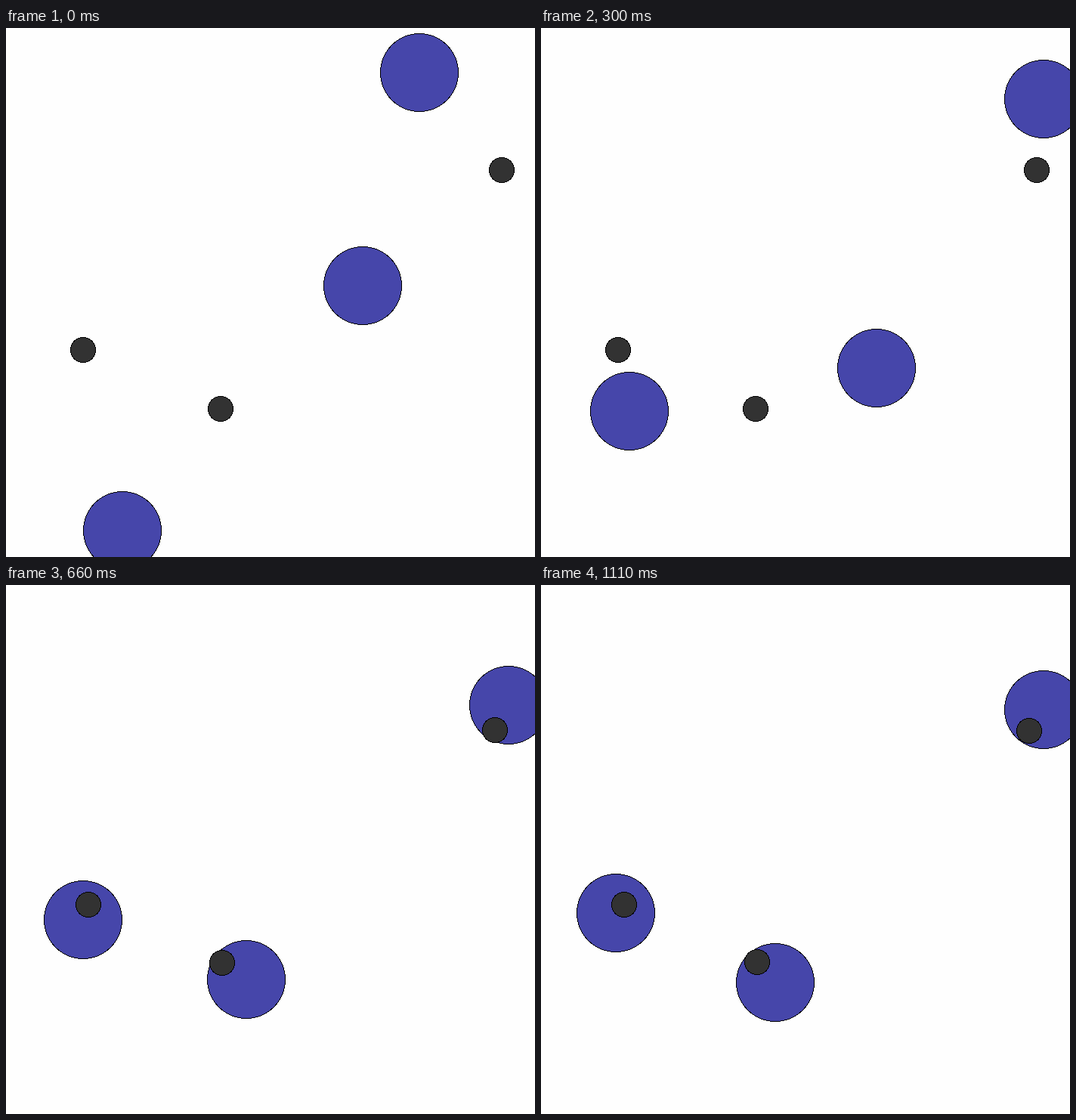
An HTML page with a canvas that plays this animation: 700x700 px, repeating every 1.17 s.

```html
<!DOCTYPE html>
<html lang="en">
<head>
<meta charset="utf-8">
<title>Settling circles</title>
<style>
html, body { margin: 0; width: 100%; height: 100%; overflow: hidden; background: #fefefe; }
canvas { display: block; }
</style>
</head>
<body>
<canvas id="stage" width="700" height="700"></canvas>
<script>
const ctx = document.getElementById('stage').getContext('2d');
const SIZE = 700, MID = SIZE / 2, MARGIN = 35, LOOP = 1170;

// Each disc swings through a few points, then settles towards its rest point
const STEPS = [0, 2, 6, 10, 14];
const SETTLE = 10;
const discs = [
  { path: [[154, 680], [149, 628], [117, 507], [111.5, 465.9]], rest: [99.3, 433.6] },
  { path: [[472, 341], [476, 386], [444, 450], [339.3, 514.2]], rest: [310.3, 526.2] },
  { path: [[547, 59], [598, 51], [680, 94], [690, 143.9]], rest: [690, 165.8] }
];
const dots = [[110.01, 423.6], [286.6, 499.76], [646.49, 193.2]];

const clamp = n => Math.max(MARGIN, Math.min(SIZE - MARGIN, n));

// Smooth polynomial through the values at STEPS
function curve(values, step) {
  return values.reduce((sum, v, i) => sum + STEPS.reduce(
    (p, s, j) => j === i ? p : p * (step - s) / (STEPS[i] - s), v), 0);
}

function discAt({ path, rest }, step) {
  return rest.map((end, axis) => {
    const coords = path.map(p => p[axis]);
    const settle = s => end + (coords[3] - end) * 0.295 ** ((s - SETTLE) / 4);
    const n = step < SETTLE ? curve([...coords, settle(14)], step) : settle(step);
    return clamp(n);
  });
}

// Dots swell away from the middle, peaking at step 2; the rise is twice as fast
function dotAt(dot, step) {
  const swell = Math.cosh((step - 2) * (step < 2 ? 0.445 : 0.2225)) ** -1.8;
  return dot.map(n => MID + (n - MID) * (1 + 0.0625 * swell));
}

// Crisp disc, filled row by row
function fillDisc(x, y, r, color) {
  ctx.fillStyle = color;
  for (let row = -r; row < r; row++) {
    const half = Math.round(Math.sqrt(r * r - (row + 0.5) ** 2));
    ctx.fillRect(x - half, y + row, 2 * half, 1);
  }
}

function circle(point, r, color) {
  const [x, y] = point.map(Math.floor);
  fillDisc(x, y, r, '#000');
  fillDisc(x, y, r - 1, color);
}

// First pose holds 90 ms, then steps alternate 30 and 60 ms
function stepAt(time) {
  const t = time - 90;
  if (t < 0) return 0;
  return 1 + 2 * Math.floor(t / 90) + (t % 90 >= 30 ? 1 : 0);
}

function draw() {
  const step = stepAt(performance.now() % LOOP);
  ctx.fillStyle = '#fefefe';
  ctx.fillRect(0, 0, SIZE, SIZE);
  for (const disc of discs) circle(discAt(disc, step), 52, '#4646aa');
  for (const dot of dots) circle(dotAt(dot, step), 17, '#323232');
  requestAnimationFrame(draw);
}
draw();
</script>
</body>
</html>
```
